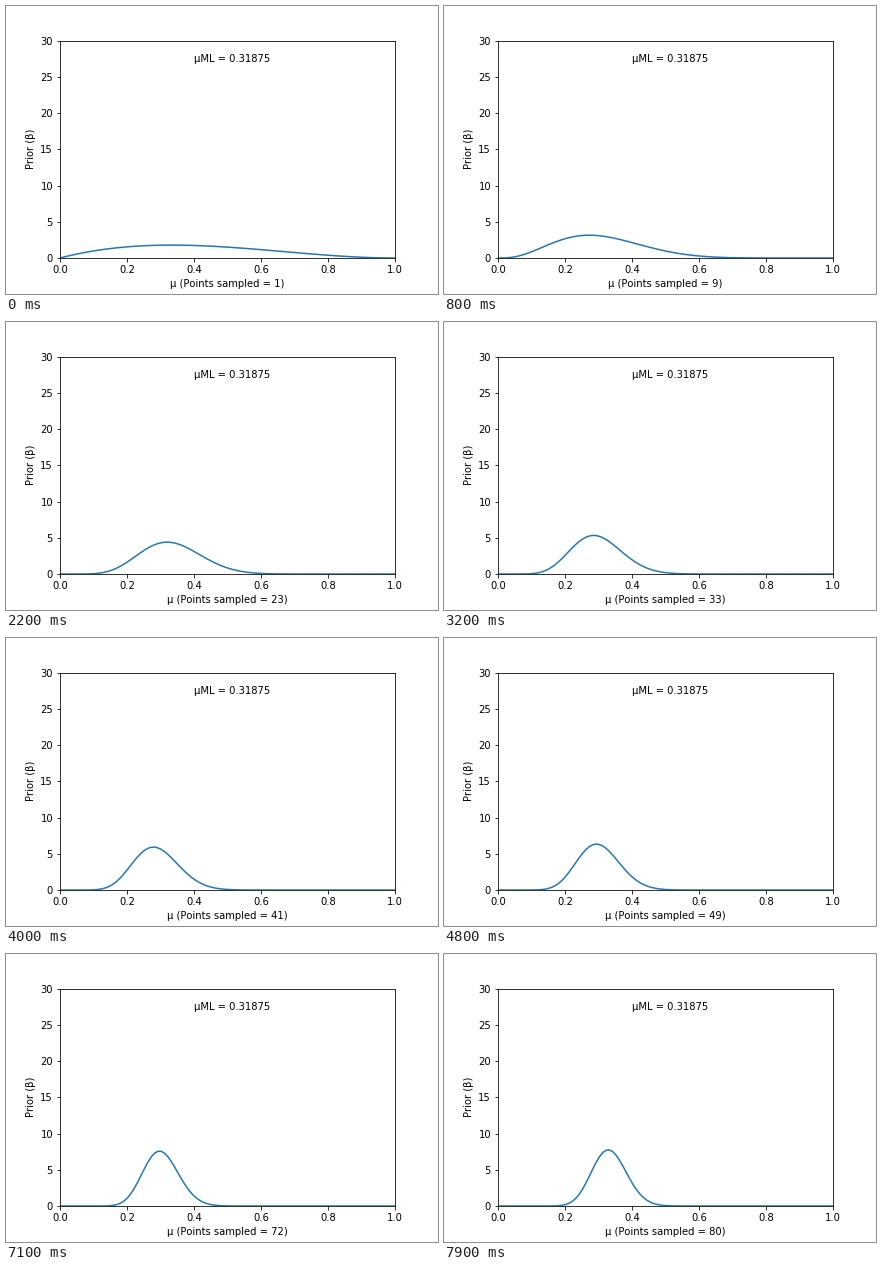
Recreate the animation shown at these times as a matplotlib script. Size 432x288 px, loop 8 s.

```python
from math import comb

import matplotlib.pyplot as plt
import numpy as np
from matplotlib.animation import FuncAnimation

plt.rcParams["font.family"] = "DejaVu Sans"
plt.rcParams["font.size"] = 10
plt.rcParams["text.kerning_factor"] = 6

POINTS = 80
MU_ML = 0.31875

# Ones drawn so far: lucky runs and dry spells as (points, ones) knots
KNOTS = [(1, 0), (9, 2), (10, 3), (20, 7), (23, 7), (28, 9),
         (33, 9), (49, 14), (54, 14), (63, 17), (80, 26)]


def ones_after(n):
    return int(np.interp(n, *zip(*KNOTS)) + 1e-9)


def beta_pdf(x, a, b):
    """Beta density for integer a and b."""
    n = a + b - 2
    return (n + 1) * comb(n, a - 1) * x ** (a - 1) * (1 - x) ** (b - 1)


fig, ax = plt.subplots(figsize=(6, 4), dpi=72, facecolor="white")
fig.subplots_adjust(left=0.125, right=0.9, bottom=0.125, top=0.88)
ax.set_xlim(0, 1)
ax.set_ylim(0, 30)
ax.set_ylabel("Prior (β)")
ax.text(0.4, 27, f"μML = {MU_ML}")

x = np.linspace(0, 1, 100)
line, = ax.plot(x, np.zeros_like(x), color="#1f77b4", lw=1.5)


def update(i):
    n = i + 1
    k = ones_after(n)
    line.set_ydata(beta_pdf(x, 2 + k, 2 + n - k))
    label = ax.set_xlabel(f"μ (Points sampled = {n})")
    return line, label


anim = FuncAnimation(fig, update, frames=POINTS, interval=100,
                     init_func=lambda: update(0), repeat=True)
plt.show()
```
